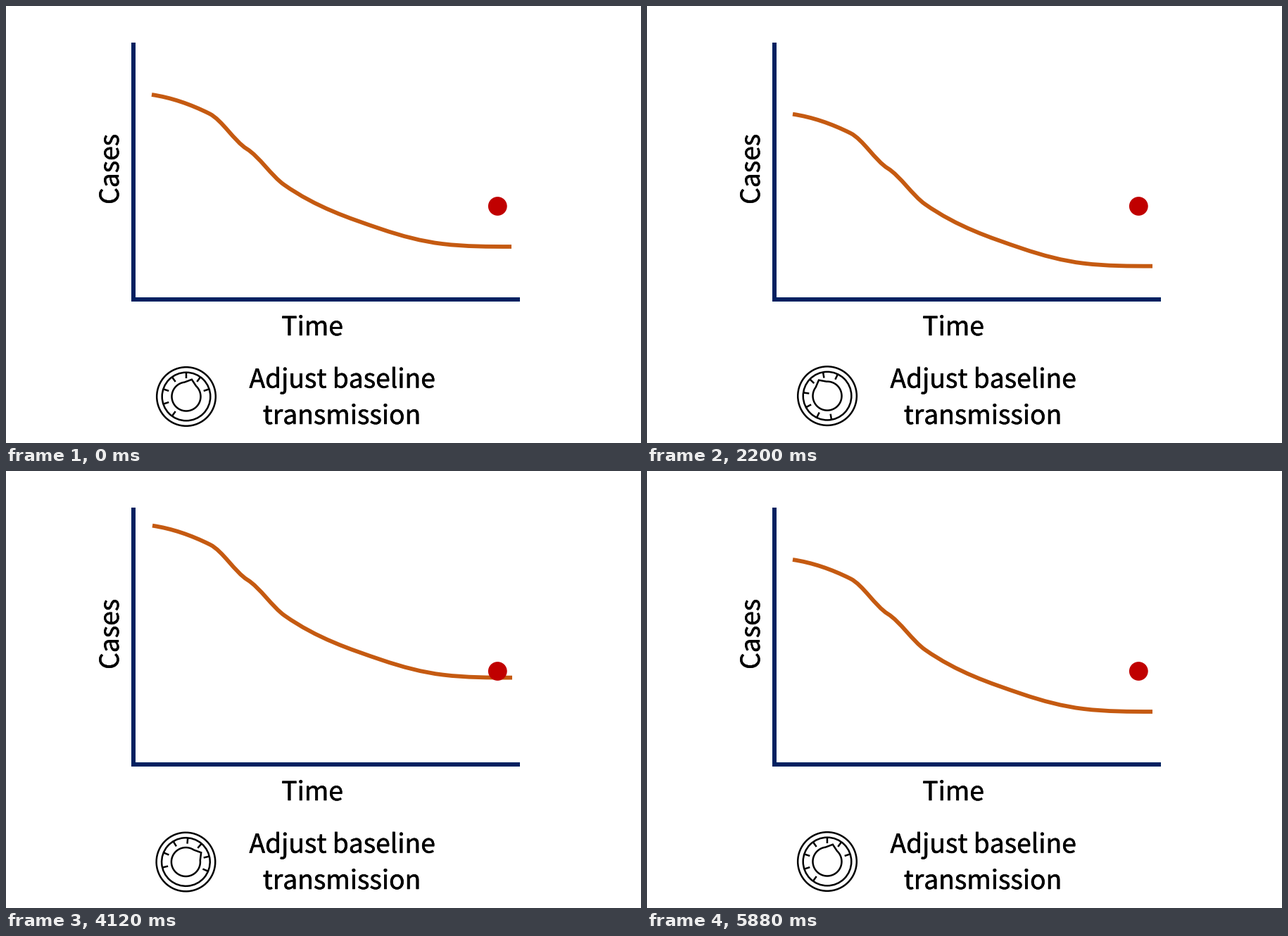
Animation, 902 px wide and 621 px high, one loop 5920 ms. Source, as a matplotlib script:

```python
import numpy as np
import matplotlib.pyplot as plt
from matplotlib.animation import FuncAnimation
from matplotlib.patches import Circle, PathPatch
from matplotlib.path import Path
from matplotlib.patheffects import withStroke
from matplotlib.transforms import Affine2D

W, H, DPI = 902, 621, 64
PX = 72 / DPI              # points per pixel
FRAMES, STEP = 148, 40     # 5920 ms loop
SPAN = 1950                # length of one move in ms

NAVY, ORANGE, RED = "#002060", "#C55A11", "#C00000"
LOW, HIGH = 28.7, -48.8    # vertical extremes of the curve's travel
PIVOT = (255, 554.5)
KNOB_SHIFT = (1, 0.5)      # the knob sits slightly off its pivot

# x, y and slope at each bend of the case curve
KNOTS = [(207, 126, 0.15), (289, 153, 0.5), (342, 203, 0.62), (395, 254, 0.7),
         (533, 317, 0.34), (620, 338, 0.12), (718, 342, 0)]

fig = plt.figure(figsize=(W / DPI, H / DPI), dpi=DPI, facecolor="white")
ax = fig.add_axes([0, 0, 1, 1])
ax.set_xlim(0, W)
ax.set_ylim(H, 0)
ax.axis("off")


def stroke(path, color, width, **kw):
    patch = PathPatch(path, fill=False, ec=color, lw=width * PX,
                      capstyle="butt", **kw)
    return ax.add_patch(patch)


def label(x, y, text, rotation=0):
    ax.text(x, y, text, family="Noto Sans CJK JP", size=37.2 * PX,
            ha="center", va="baseline", color="black",
            rotation=rotation, rotation_mode="anchor",
            path_effects=[withStroke(linewidth=0.5 * PX, foreground="black")])


def polar(radius, degrees):
    """Points at clockwise angles from the top."""
    a = np.radians(degrees)
    return np.column_stack((radius * np.sin(a), -radius * np.cos(a)))


def knob_path():
    parts = [Path.circle((0, 0), r) for r in (41.8, 34.3)]
    for deg in range(-144, 73, 36):
        parts.append(Path(polar(np.array([26, 34.3]), np.full(2, deg))))
    tip = 18
    arc = polar(20.5, np.linspace(tip + 25, tip + 335, 90))
    point = polar(25.5, np.array([tip]))
    parts.append(Path(np.vstack((arc, point, arc[:1])), closed=True))
    return Path.make_compound_path(*parts)


def curve_path():
    """Cubic Hermite spline through the knots."""
    pts = [KNOTS[0][:2]]
    for (x0, y0, s0), (x1, y1, s1) in zip(KNOTS, KNOTS[1:]):
        d = (x1 - x0) / 3
        pts += [(x0 + d, y0 + d * s0), (x1 - d, y1 - d * s1), (x1, y1)]
    return Path(pts, [Path.MOVETO] + [Path.CURVE4] * (len(pts) - 1))


def ease(u):
    return u - np.sin(2 * np.pi * u) / (2 * np.pi)


stroke(Path([(181, 51.5), (181, 417), (730, 417)]), NAVY, 6,
       joinstyle="miter")
label(160, 232, "Cases", rotation=90)
label(435, 468, "Time")
label(477.5, 542.5, "Adjust baseline")
label(477, 594, "transmission")

curve = stroke(curve_path(), ORANGE, 5.8, joinstyle="round")
knob = stroke(knob_path(), "black", 2.5, joinstyle="miter")
ax.add_patch(Circle((698.3, 284.5), 13.4, fc=RED, ec="none", zorder=3))


def update(i):
    # down, up and back: the knob turns once per move, reversing each time
    move, u = divmod(min(i * STEP / SPAN, 2.9999), 1)
    start, end = [(0, LOW), (LOW, HIGH), (HIGH, 0)][int(move)]
    dy = start + (end - start) * ease(u)
    dx = max(0, dy / HIGH)
    curve.set_transform(Affine2D().translate(dx, dy) + ax.transData)

    spin = 360 * u * (-1) ** move
    turn = Affine2D().translate(*KNOB_SHIFT).rotate_deg(spin)
    knob.set_transform(turn.translate(*PIVOT) + ax.transData)
    return curve, knob


anim = FuncAnimation(fig, update, frames=FRAMES, interval=STEP,
                     repeat=True, repeat_delay=0, blit=False)
plt.show()
```
